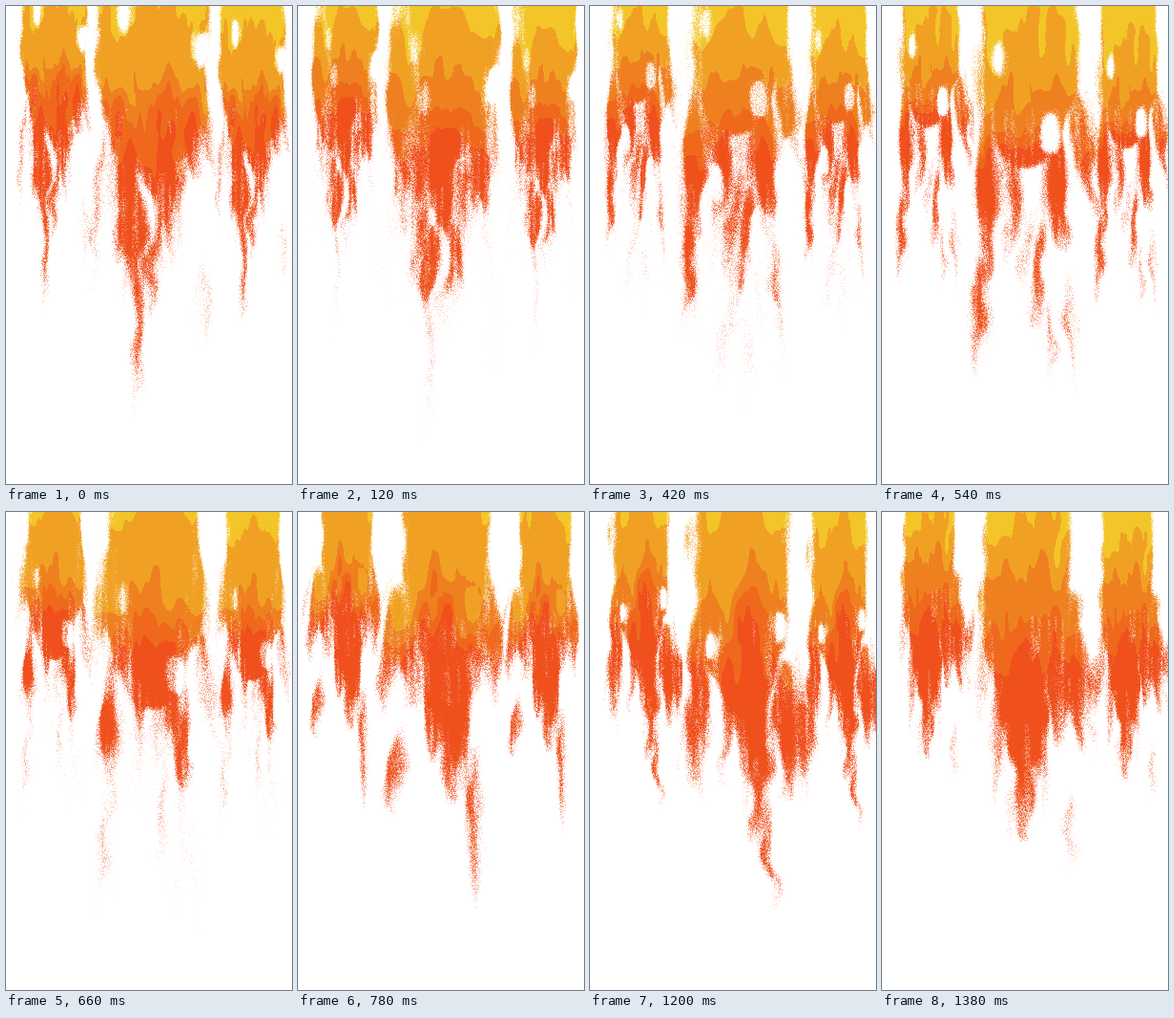
These frames come from a looping animation (300x500 px, 1.44 s). An HTML page with a canvas:

```html
<!DOCTYPE html>
<html lang="en">
<head>
<meta charset="utf-8">
<title>Flames</title>
<style>
html, body { margin: 0; width: 100%; height: 100%; overflow: hidden; background: #fff; }
canvas { display: block; }
</style>
</head>
<body>
<canvas id="stage" width="300" height="500"></canvas>
<script>
const LOOP = 1440, STEP = 60, FLOW = 0.3;
const X0 = 70, Y0 = -150, W = 180, H = 620;
const COLORS = [[243, 197, 40], [240, 161, 36], [238, 128, 32], [239, 104, 28], [239, 80, 28]];
// every flame samples one field; the outer two are smaller
const FLAMES = [
  { from: 0, to: 97, x: 68, sx: 1.71, sy: 1.335, dx: 0, dy: 0 },
  { from: 205, to: 300, x: 68, sx: 1.71, sy: 1.335, dx: 208, dy: 22 },
  { from: 78, to: 242, x: 0, sx: 1, sy: 1, dx: 0, dy: 0 }
];

const clamp = v => v < 0 ? 0 : v > 1 ? 1 : v;
const mix = (a, b, k) => a + (b - a) * k;
const ease = v => v * v * (3 - 2 * v);
const bump = d => Math.exp(-d * d);

function hash(x, y, z) {
  let n = Math.imul(x, 374761393) + Math.imul(y, 668265263) + Math.imul(z, 1442695041);
  n = Math.imul(n ^ (n >>> 13), 1274126177);
  return ((n ^ (n >>> 16)) >>> 0) / 4294967296;
}

function noise(x, y, seed) {
  const i = Math.floor(x), j = Math.floor(y), u = ease(x - i), v = ease(y - j);
  return mix(mix(hash(i, j, seed), hash(i + 1, j, seed), u),
             mix(hash(i, j + 1, seed), hash(i + 1, j + 1, seed), u), v);
}

// spindle from (ax, ay) to (bx, by); wide ones are dense
function strand(g, ax, ay, bx, by, w, d, sway) {
  const edge = [];
  for (let i = 0; i <= 16; i++) {
    const k = i / 16;
    const x = mix(ax, bx, k) + sway * Math.sin(Math.PI * k);
    const r = w / 2 * (0.2 + 0.8 * Math.sin(Math.PI * Math.pow(k, 0.75)));
    edge.push([x - r, mix(ay, by, k)]);
    edge.unshift([x + r, mix(ay, by, k)]);
  }
  const fade = g.createLinearGradient(0, ay, 0, by);
  [0.7, 1, 0.45].forEach((f, i) => fade.addColorStop(i / 2, `rgba(0,0,0,${d * f})`));
  g.fillStyle = fade;
  g.beginPath();
  edge.forEach(p => g.lineTo(...p));
  g.fill();
}

function cover(p, seed) {
  const c = document.createElement("canvas");
  c.width = W;
  c.height = H;
  const g = c.getContext("2d");
  g.translate(-X0, -Y0);
  const [l, r] = p.sides, shoulder = p.base * 0.45;
  const fade = g.createLinearGradient(0, 90, 0, 210);
  fade.addColorStop(0, "#000");
  fade.addColorStop(1, "rgba(0,0,0,.8)");
  g.filter = "blur(2.5px)";
  g.fillStyle = fade;
  g.beginPath();
  g.moveTo(l, Y0);
  g.lineTo(l, shoulder);
  g.quadraticCurveTo(l + 14, p.base, p.core, p.base);
  g.quadraticCurveTo(r - 14, p.base, r, shoulder);
  g.lineTo(r, Y0);
  g.fill();

  p.strands.forEach(([ax, ay, bx, by, w], n) => {
    const d = Math.min(1, w / 22), rnd = i => hash(n, i, seed) - 0.5;
    strand(g, ax, ay, bx, by, w, d, rnd(0) * 8);
    // thin hairs beside it
    for (let i = 1; i < 4; i++) {
      const off = rnd(i) * w * 2, drop = rnd(i + 5) * 50;
      strand(g, ax + off * 0.4, ay + drop, bx + off, by + drop - 15, w * 0.4, d * 0.5, rnd(i + 9) * 12);
    }
  });

  g.globalCompositeOperation = "destination-out";
  g.fillStyle = "#000";
  for (const [x, y, s] of p.holes) {
    g.beginPath();
    g.ellipse(x, y, s, s * 2.4, 0, 0, 7);
    g.fill();
  }

  // ragged edges: sample sideways by noise that grows downwards
  const data = g.getImageData(0, 0, W, H).data, out = new Uint8Array(W * H);
  for (let y = 0; y < H; y++) for (let x = 0; x < W; x++) {
    const amp = 5 + Math.max(0, y + Y0) / 35;
    const sx = x + Math.round(amp * (noise(x / 14, y / 30, seed) - 0.5));
    if (sx >= 0 && sx < W) out[y * W + x] = data[(y * W + sx) * 4 + 3];
  }
  return out;
}

// depth towards the hot end, with upright licks
function heat(p, seed) {
  const out = new Int16Array(W * H);
  for (let i = 0; i < out.length; i++) {
    const x = i % W + X0, y = Math.floor(i / W) + Y0;
    let v = y + 64 * (noise(x / 13, y / 55, seed + 20) - 0.5) + 26 * (noise(x / 5, y / 26, seed + 40) - 0.5);
    v += p.peak * bump((x - p.core) / 20);
    for (const [hx, hy, s] of p.holes)
      if (hy < 100) v -= 70 * bump(Math.hypot(x - hx, (y - hy) / 2) / s / 1.3);
    out[i] = v;
  }
  return out;
}

const fields = [];
function pose(t, p) {
  const seed = fields.length + 1;
  fields.push({ t, tones: p.tones, cover: cover(p, seed), heat: heat(p, seed) });
}

// tones: depths where the next colour starts; strands: x y, x y, width; holes: x y size
pose(0, {
  sides: [95, 212], base: 175, core: 150, peak: 0, tones: [0, 82, 110, 140],
  strands: [[200, 60, 198, 182, 28], [152, 100, 166, 228, 34], [130, 110, 118, 270, 20], [176, 130, 172, 275, 16],
    [132, 170, 140, 318, 20], [137, 280, 135, 430, 11], [104, 130, 92, 300, 9], [160, 210, 150, 330, 13], [202, 265, 208, 362, 7]],
  holes: [[125, 8, 8], [207, 46, 8]]
});
pose(240, {
  sides: [118, 211], base: 165, core: 158, peak: 50, tones: [45, 78, 138, 168],
  strands: [[115, 60, 104, 235, 24], [106, 170, 108, 298, 12], [142, 100, 124, 242, 18], [182, 90, 192, 255, 20],
    [192, 220, 207, 345, 11], [155, 110, 150, 288, 28], [150, 250, 132, 352, 17], [160, 260, 162, 380, 13], [98, 55, 97, 200, 13]],
  holes: [[130, 132, 8], [178, 195, 7]]
});
pose(540, {
  sides: [106, 205], base: 170, core: 148, peak: 10, tones: [22, 88, 132, 155],
  strands: [[112, 100, 114, 282, 23], [132, 130, 134, 270, 15], [183, 130, 188, 258, 22], [206, 90, 224, 232, 18],
    [168, 225, 160, 338, 16], [172, 310, 176, 400, 8], [108, 260, 100, 390, 14], [192, 280, 203, 408, 9], [100, 40, 104, 140, 10]],
  holes: [[122, 55, 7], [177, 133, 9]]
});
pose(780, {
  sides: [111, 200], base: 168, core: 148, peak: 52, tones: [-5, 98, 125, 150],
  strands: [[170, 130, 161, 305, 26], [140, 140, 143, 262, 26], [198, 55, 207, 202, 19], [178, 100, 184, 192, 16],
    [104, 75, 86, 210, 18], [114, 80, 116, 205, 20], [104, 235, 98, 318, 15], [183, 245, 184, 412, 13]],
  holes: []
});
pose(1020, {
  sides: [102, 209], base: 185, core: 150, peak: 25, tones: [0, 95, 132, 165],
  strands: [[130, 110, 145, 254, 28], [186, 120, 186, 342, 28], [195, 110, 210, 230, 16], [110, 130, 117, 240, 17],
    [151, 210, 160, 392, 11], [108, 230, 107, 298, 6], [106, 20, 90, 90, 11]],
  holes: [[119, 22, 10]]
});
pose(1200, {
  sides: [112, 208], base: 215, core: 168, peak: 55, tones: [20, 100, 138, 175],
  strands: [[152, 90, 170, 285, 36], [178, 150, 174, 345, 24], [120, 90, 108, 288, 19], [121, 180, 116, 308, 11],
    [204, 155, 206, 302, 24], [220, 200, 222, 277, 14], [185, 285, 193, 415, 13], [106, 0, 108, 70, 9]],
  holes: [[130, 140, 6], [197, 120, 7]]
});
pose(1380, {
  sides: [108, 197], base: 200, core: 150, peak: 15, tones: [25, 72, 118, 155],
  strands: [[140, 80, 153, 344, 36], [168, 140, 165, 278, 20], [198, 80, 209, 252, 24], [185, 140, 185, 247, 20],
    [226, 150, 226, 213, 14], [114, 50, 122, 197, 20], [195, 295, 196, 378, 8], [102, 110, 100, 245, 7], [129, 190, 118, 310, 8]],
  holes: []
});

const ctx = document.getElementById("stage").getContext("2d");
const img = ctx.createImageData(300, 500);
const px = img.data;

function draw(step) {
  const t = step * STEP;
  let i = fields.length - 1;
  while (fields[i].t > t) i--;
  const a = fields[i], b = fields[(i + 1) % fields.length];
  const end = b.t || LOOP;
  const k = (t - a.t) / (end - a.t), mid = 2.4 * k * (1 - k);
  const down = Math.round((t - a.t) * FLOW), up = Math.round((end - t) * FLOW);
  const tones = a.tones.map((v, n) => mix(v, b.tones[n], k));

  px.fill(255);
  for (const f of FLAMES) for (let y = 0; y < 470; y++) {
    const fy = Math.round((y - f.dy) * f.sy);
    const ya = fy - Y0 - down, yb = Math.min(H - 1, fy - Y0 + up);
    if (ya >= H) break;
    for (let x = f.from; x < f.to; x++) {
      const fx = Math.round((x - f.dx) * f.sx + f.x) - X0;
      if (fx < 0 || fx >= W) continue;
      const ia = ya * W + fx, ib = yb * W + fx;
      let c = mix(a.cover[ia], b.cover[ib], k) / 255;
      if (c < 0.01) continue;
      c = mix(c, ease(clamp((c - 0.2) / 0.6)), mid);
      if (c < 0.97) c *= 0.65 + 0.6 * noise(fx / 3.5, (fy - t * FLOW) / 34, 9);
      const o = clamp((c - hash(x, y, step + 1)) * 0.9 + c);
      if (o <= 0) continue;
      const v = mix(a.heat[ia], b.heat[ib], k);
      const col = COLORS[tones.filter(d => v > d).length];
      const q = (y * 300 + x) * 4;
      for (let n = 0; n < 3; n++) px[q + n] = mix(px[q + n], col[n], o);
    }
  }
  ctx.putImageData(img, 0, 0);
}

let last = -1;
function tick() {
  const step = Math.floor(performance.now() % LOOP / STEP);
  if (step !== last) draw(last = step);
  requestAnimationFrame(tick);
}
tick();
</script>
</body>
</html>
```
